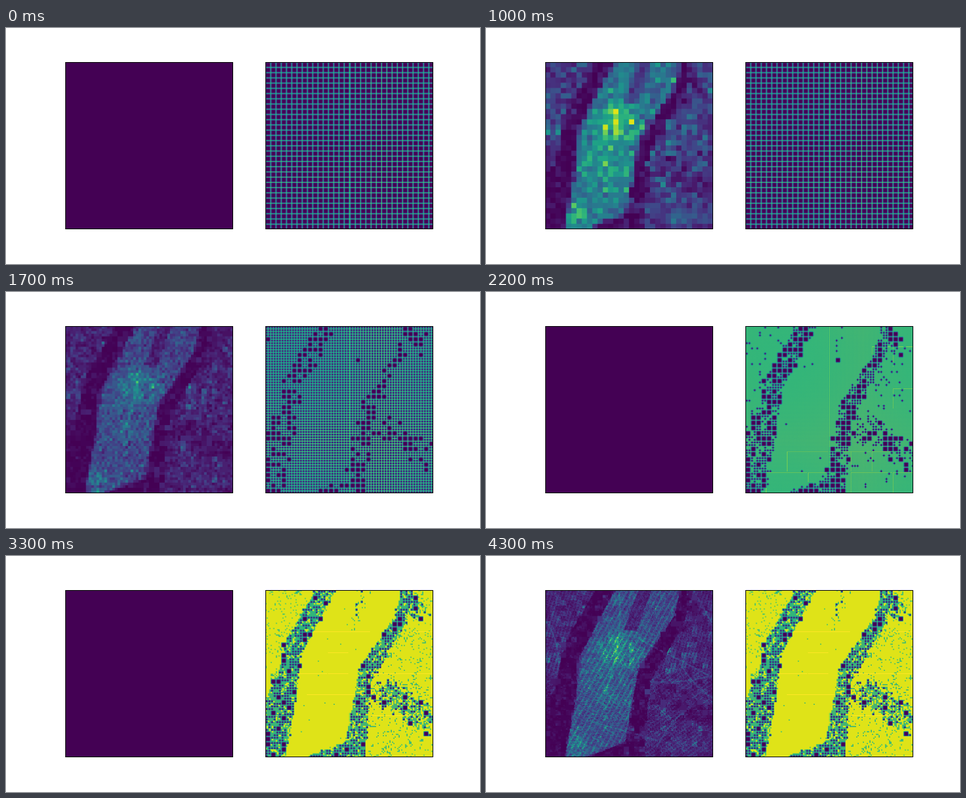
A matplotlib script that plays this animation: 720 by 360 pixels, repeating every 4400 ms.

```python
import numpy as np
import matplotlib.pyplot as plt
from matplotlib.animation import FuncAnimation

N, SIDE = 256, 255
STEPS, PHASES = 11, 4
rng = np.random.default_rng(7)
V, U = np.mgrid[:N, :N].astype(float)


def blob(u, v, r):
    return np.exp(-((U - u) ** 2 + (V - v) ** 2) / (2 * r * r))


def road(a, b, bend=0.0, width=1.0):
    """Soft line from a to b, bowed sideways by bend."""
    (u0, v0), (u1, v1) = a, b
    length = np.hypot(u1 - u0, v1 - v0)
    du, dv = (u1 - u0) / length, (v1 - v0) / length
    t = ((U - u0) * du + (V - v0) * dv) / length
    off = (V - v0) * du - (U - u0) * dv - 4 * bend * t * (1 - t)
    return np.exp(-(off / width) ** 2) * ((t >= 0) & (t <= 1))


def streets(angle, wide, narrow, cross):
    c, s = np.cos(angle), np.sin(angle)
    across = np.abs(np.cos(np.pi * (U * c + V * s) / wide)) ** 4
    along = np.abs(np.cos(np.pi * (U * s - V * c) / narrow)) ** 4
    return np.maximum(across, cross * along)


def expand(a):
    k = N // len(a)
    return a.repeat(k, 0).repeat(k, 1)


def means(a, s):
    return a.reshape(N // s, s, N // s, s).mean(axis=(1, 3))


def blocks(sigma):
    return expand(rng.lognormal(-sigma ** 2 / 2, sigma, (32, 32)))


# --- the map: an island between two rivers ---
west = np.interp(V, [0, 105, 165, 255], [106, 51, 47, 30])
east = np.interp(V, [0, 40, 120, 230], [206, 196, 142, 122])
far_west = np.interp(V, [0, 75, 130, 170], [76, 32, 18, -1])
far_east = np.interp(V, [0, 50, 140, 255], [224, 212, 160, 150])
island = (U > west) & (U < east) & (V + 0.37 * U < 278)
water = (U > far_west) & (U < far_east) & ~island
park = (np.abs(U - 152 + 0.37 * V) < 10) & (V < 62)
marsh = blob(225, 25, 10) + sum(blob(182 + 15 * k, 153 + 10 * k, 11) for k in range(5))
marsh = np.clip(marsh, 0, 1) * ~island
wet = np.where(water, 1, np.maximum(0.7 * marsh, 0.14 * park))

town = (0.19 + 0.1 * blob(185, 115, 25)) * (1 - 0.6 * marsh) * blocks(0.4)
town *= 0.6 + 0.9 * streets(np.where(V > 125, 0.95, 0.3), 5.3, 4.1, 0.7)
city = 0.38 + 0.45 * blob(110, 92, 18) + 0.14 * blob(92, 150, 28) + 0.22 * blob(45, 236, 15)
city = np.where(park, 0.16, city) * blocks(0.13)
city *= 0.72 + 0.65 * streets(0.51, 7.3, 5.2, 0.5)
density = np.where(island, city, np.where(water, 0.03 * blocks(0.7), town))
density *= rng.lognormal(-0.03, 0.25, (N, N))

density += 0.22 * (road((145, 76), (254, 133))             # bridges and highways
                   + road((160, 140), (254, 131), 4)
                   + road((205, 112), (254, 165), 4)
                   + road((170, 240), (241, 164), -8)
                   + road((60, 198), (170, 230))
                   + road((226, 0), (254, 50))
                   + road((0, 46), (8, 160), -16)
                   + road((134, 140), (128, 230), 4)
                   + road((113, 5), (88, 165), -9, 1.4))

# --- quadtree leaves per phase ---
HOLD = (1, 0.68, 0.58, 0.15)   # odds that open water stays unsplit, by age
dice = {s: rng.random((N // s, N // s)) for s in (2, 4, 8)}
sparse = ~island * blocks(0.8)


def leaves(phase):
    size = np.ones((N, N), int)
    for s in (2, 4, 8):
        age = phase - (3 - int(np.log2(s)))
        if age < 0:
            continue
        odds = HOLD[age] * means(wet, s)
        if age == 0:
            odds += 1
        elif age == 1:
            odds += 0.045 * (phase - 1) * means(sparse, s) + 0.002
        size[expand(dice[s] < odds)] = s
    return size


# 256 cells drawn on 255 pixels: the small misfit gives a slow beat
src = np.minimum(np.arange(SIDE) * N / SIDE + 0.31, N - 1)
lo = np.minimum(src.astype(int), N - 2)
frac = src - lo


def resample(a):
    a = a[lo] * (1 - frac)[:, None] + a[lo + 1] * frac[:, None]
    return a[:, lo] * (1 - frac) + a[:, lo + 1] * frac


def soften(a, side=0.14):
    for axis in (0, 1):
        pad = np.pad(a, [(1, 1) if k == axis else (0, 0) for k in (0, 1)], mode="edge")
        before, after = np.split(pad, [N], axis)[0], np.split(pad, [2], axis)[1]
        a = (1 - 2 * side) * a + side * (before + after)
    return a


def framed(value, width=SIDE):
    rgb = plt.cm.viridis(np.clip(value[:, :width], 0, 1))[..., :3]
    rgb[[0, -1]] = 0
    rgb[:, [0, -1]] = 0
    return rgb


def tree_image(phase, size):
    edge = (U % size == 0) | (V % size == 0)
    solid = resample((size == 1) * 1.0)
    value = resample(soften(edge * 1.0)) * 0.88
    value += solid * (0.95 - value)
    if phase > 1:
        # stray brighter pieces on the lattice of large tiles
        accent = np.zeros((SIDE, SIDE), bool)
        for x, y, tiles in rng.integers([0, 1, 1], [8, 8, 3], (12, 3)) * SIDE // 8:
            accent[y, x:x + tiles] = True
            if phase == 2 and x > 0:
                accent[y:y + SIDE // 8, x] = True
        bright = 1 if phase == 3 else 0.8
        value[accent & (resample(size) < 2.5)] = bright
    return framed(value, SIDE - 1)


def count_images(phase, size):
    gain = 1 - 0.13 * phase
    small = 8 >> phase
    total = np.zeros((N, N))
    for step in range(STEPS):
        if step:
            for s in dice.keys() | {1}:
                rate = means(density, s) * gain
                if s > small:
                    rate = np.minimum(rate * 1.3, 0.13)
                total += np.where(size == s, expand(rng.poisson(rate * 9)), 0)
        yield framed(resample(total / 90))


trees, counts = [], []
for phase in range(PHASES):
    size = leaves(phase)
    trees.append(tree_image(phase, size))
    counts.extend(count_images(phase, size))

fig = plt.figure(figsize=(7.2, 3.6), dpi=100, facecolor="white")


def panel(x, first):
    height, width = first.shape[:2]
    ax = fig.add_axes([x / 720, 53 / 360, width / 720, height / 360])
    ax.axis("off")
    return ax.imshow(first, interpolation="nearest", aspect="auto")


left = panel(90, counts[0])
right = panel(394, trees[0])


def update(i):
    left.set_data(counts[i])
    right.set_data(trees[i // STEPS])
    return left, right


anim = FuncAnimation(fig, update, frames=STEPS * PHASES, interval=100,
                     repeat=True, repeat_delay=0, blit=False)
plt.show()
```
